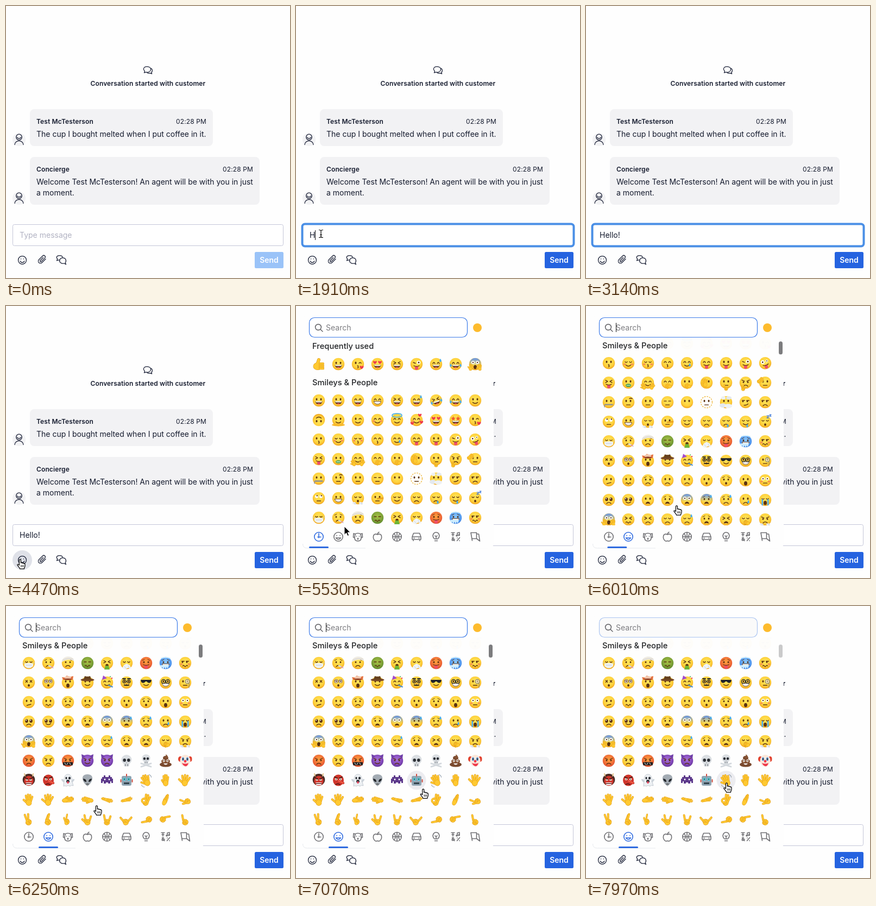
These frames come from a looping animation (523 px wide and 501 px high, 8000 ms). An HTML page:

```html
<!DOCTYPE html>
<html lang="en">
<head>
<meta charset="utf-8">
<title>Support chat</title>
<style>
  html, body { margin: 0; width: 100%; height: 100%; overflow: hidden; background: #fefefe; }
  svg { display: block; width: 100vw; height: 100vh; font-family: Inter, sans-serif; }
  text { font-size: 14px; fill: #151b2e; white-space: pre; }
  .small { font-size: 12px; letter-spacing: .12px; }
  .bold { font-weight: 600; }
  .head { font-size: 14.7px; font-weight: 500; fill: #222427; }
  .icon { fill: none; stroke: #171d33; stroke-width: 1.25; stroke-linecap: round; stroke-linejoin: round; }
  .nav { fill: none; stroke: currentColor; stroke-width: 1.6; stroke-linecap: round; stroke-linejoin: round; }
</style>
</head>
<body>
<svg viewBox="0 0 523 501">
  <defs>
    <clipPath id="view"><rect x="24" y="58" width="318.5" height="346"/></clipPath>
    <clipPath id="heads"><rect x="24" y="58" width="330" height="346"/></clipPath>
    <linearGradient id="chill" x2="0" y2="1"><stop stop-color="#5c8ff0"/><stop offset=".65" stop-color="#7fb0f5" stop-opacity="0"/></linearGradient>
    <g id="person">
      <circle r="12" fill="#f2f2f4"/>
      <g class="icon"><circle cy="-4.5" r="5.3"/><path d="M-3.6 -4.2Q0 .4 3.6 -4.2M-8 9.5C-7.5 0 7.5 0 8 9.5"/></g>
    </g>
    <path id="beam" d="M-3.5 -7q3 0 3.5 1.5q.5 -1.5 3.5 -1.5M0 -5.5V5.5M-3.5 7q3 0 3.5 -1.5q.5 1.5 3.5 1.5M-1.5 2h3"/>
  </defs>

  <g class="icon">
    <path d="M254.5 123l1 -3C252 117 253 111.5 259.5 111.5C266 111.5 267.5 116 266 119C264 122.5 260 122.5 258 121.8Z"/>
    <path d="M267.5 115C270 117 270 120 268 122l.6 2.8 -3 -1.2C263 124.3 261 123.8 260 122.8"/>
  </g>
  <text class="small bold" x="261.5" y="147" text-anchor="middle">Conversation started with customer</text>

  <rect x="44" y="190" width="337" height="68" rx="8" fill="#f2f2f4"/>
  <text class="small bold" x="56" y="217">Test McTesterson</text>
  <text class="small" x="369" y="217" text-anchor="end">02:28 PM</text>
  <text x="56" y="241">The cup I bought melted when I put coffee in it.</text>
  <use href="#person" x="24" y="246"/>

  <rect x="44" y="278" width="423" height="88" rx="8" fill="#f2f2f4"/>
  <text class="small bold" x="56" y="305">Concierge</text>
  <text class="small" x="455" y="305" text-anchor="end">02:28 PM</text>
  <text x="56" y="329">Welcome Test McTesterson! An agent will be with you in just</text>
  <text x="56" y="349">a moment.</text>
  <use href="#person" x="24" y="354"/>

  <rect x="12.5" y="402.5" width="498" height="39" rx="3" fill="#fff" stroke="#c4c6d8"/>
  <rect id="ring" x="11.5" y="401.5" width="500" height="41" rx="5" fill="#fff" stroke="#4a8fe6" stroke-width="4"/>
  <text id="hint" x="25" y="427" style="fill:#b1b2c2">Type message</text>
  <text id="typed" x="25" y="427"></text>
  <rect id="caret" y="413" width="1" height="18" fill="#111"/>

  <rect id="send" x="458" y="453" width="53" height="30" rx="2.5"/>
  <text class="bold" x="484.5" y="473" text-anchor="middle" style="fill:#fff">Send</text>

  <circle id="glow" cx="30" cy="468" r="18" fill="#dfe1e8"/>
  <g class="icon">
    <circle cx="30" cy="468" r="7.5"/>
    <path d="M26 470Q30 475 34 470M27.5 465.5v.5M32.5 465.5v.5"/>
    <path d="M73 466l-6.8 6.8a3.9 3.9 0 0 1 -5.6 -5.6l7 -7a2.7 2.7 0 0 1 3.9 3.9l-6.6 6.6a1.3 1.3 0 0 1 -1.9 -1.9l5.5 -5.5"/>
    <path d="M104.3 463C104 461 102 459.5 98.5 459.5C94 459.5 91.5 462.5 94.8 466l-1.3 3 3.5 -1.2 1.5 .2"/>
    <path d="M110.5 476l-1.3 -3C112 469 110 463.8 104.5 463.8C98.5 463.8 97.5 470 100 472.4C102 474.5 105 474.6 107 474Z"/>
  </g>

  <g id="picker">
    <rect x="11" y="18" width="353" height="428.5" rx="9" fill="#fefefe"/>
    <path d="M12.5 438q0 8 8 8H128" fill="none" stroke="#e8eaee"/>
    <g clip-path="url(#view)"><g id="list"><circle id="spot" r="17.5" fill="#ececf0"/></g></g>
    <g clip-path="url(#heads)">
      <g id="head1"><rect x="24" y="-16" width="318" height="31" fill="#fefefe" opacity=".975"/><text class="head" x="30" y="5">Frequently used</text></g>
      <g id="head2"><rect x="24" y="-16" width="318" height="31" fill="#fefefe" opacity=".975"/><text class="head" x="30" y="5">Smileys &amp; People</text></g>
    </g>
    <rect id="thumb" x="355" width="7" height="24" rx="3.5" fill="#7c7c7e"/>
    <rect x="24" y="21" width="292" height="37" rx="10" fill="#f7f7f8"/>
    <rect id="search" x="24.5" y="21.5" width="291" height="36" rx="9.5" fill="#fff" stroke="#3d7be8" stroke-width="1.2"/>
    <g fill="none" stroke="#6a6a6e" stroke-width="1.6" stroke-linecap="round"><circle cx="41" cy="39" r="5.4"/><path d="M45 43l4 4"/></g>
    <text x="55" y="45" style="fill:#7c7c80">Search</text>
    <rect id="caret2" x="55" y="31" width="1" height="17" fill="#111"/>
    <circle cx="334" cy="40" r="8" fill="#fdbb2d"/>
    <g id="tabs"></g>
    <rect id="bar" y="443" width="36" height="3" rx="1.5" fill="#2f6be0"/>
  </g>

  <g id="ibeam" fill="none" stroke-linecap="round">
    <use href="#beam" stroke="#fff" stroke-width="2.6"/>
    <use href="#beam" stroke="#000" stroke-width="1.2"/>
  </g>
  <path id="arrow" d="M0 0V15.5L3.6 12 6 17.5 8.6 16.4 6.2 11H11Z" fill="#000" stroke="#fff"/>
  <g id="point" stroke="#000" stroke-linecap="round" stroke-linejoin="round">
    <path d="M-1.6 1.2C-1.6 -.6 1.4 -.6 1.4 1.2V6.2C2 5.2 4 5.4 4.2 6.8C4.8 5.9 6.6 6.2 6.8 7.6C7.4 6.9 9 7.2 9 8.8V11.5C9 14 7.5 14.6 7.5 17H-.5C-1 14.6 -4 12.4 -5 10C-5.4 8.4 -3.4 8.2 -1.6 10.4Z" fill="#fff" stroke-width="1.25"/>
    <path d="M1.8 10.5v3M4 10.5v3M6.2 10.5v3" fill="none" stroke-width=".9"/>
  </g>
</svg>

<script>
const $ = id => document.getElementById(id);
const INK = '#5c3312', RED = '#ee3a4c', SKY = '#4aaef0', GOLD = '#ffc931', EDGE = '#dd9512';

// Drawing helpers; every emoji is centred on 0,0 with a radius near 11
const line = (d, c = INK, w = 1.4) => `<path d="${d}" fill="none" stroke="${c}" stroke-width="${w}" stroke-linecap="round" stroke-linejoin="round"/>`;
const fill = (d, c = INK) => `<path d="${d}" fill="${c}"/>`;
const oval = (x, y, rx, ry = rx, c = INK) => `<ellipse cx="${x}" cy="${y}" rx="${rx}" ry="${ry}" fill="${c}"/>`;
const pair = f => f(-4) + f(4);
const limb = d => line(d, EDGE, 3.9) + line(d, GOLD, 2.8);
const drop = (x, y, c = SKY) => fill(`M${x} ${y}c-3 4 -1.5 6 0 6s3 -2 0 -6z`, c);
const heart = (x, y, r) => fill(`M${x} ${y + r}C${x - 2 * r} ${y - r * .4} ${x - r * .8} ${y - r * 1.5} ${x} ${y - r * .4}C${x + r * .8} ${y - r * 1.5} ${x + 2 * r} ${y - r * .4} ${x} ${y + r}Z`, RED);
const star = x => fill(`M${x} -7l1.2 2.8 3 .2-2.3 2 .8 3-2.7-1.6-2.7 1.6.8-3-2.3-2 3-.2z`, '#ee5a2c');

// up: raised fingers from thumb to little finger; fan: how far the tips spread
function hand(up, turn = 0, slim = 1, fan = 1, wave = '') {
  const fingers = [[-3, 6, -9.5, 0], [-3.6, 2, -5.4, -7.5], [-1.2, 1, -1.4, -9.5], [1.4, 1, 2.6, -8.8], [3.6, 3, 6.4, -5.5]];
  let out = '', curled = '';
  fingers.forEach(([x, y, X, Y], i) => {
    if (+up[i]) out += limb(`M${x} ${y}L${X * fan} ${Y}`);
    else if (i) curled += limb(`M${x} ${y + .5}v2.5`);
    else curled += limb('M-3.5 7L1 6');
  });
  const palm = oval(0, 5.4, 5.4, 5.6, EDGE) + oval(0, 5.2, 4.9, 5.2, GOLD);
  const air = wave && line('M-11 4q-1 4 3 6M9 -7q3 2 2 6', '#8b97a5', 1);
  return `<g transform="rotate(${turn}) scale(${slim} 1)">${out}${palm}${curled}${air}</g>`;
}
const paw = (x, y, turn, up = '11111', k = .55) => `<g transform="translate(${x} ${y}) scale(${k})">${hand(up, turn)}</g>`;

const dots = pair(x => oval(x, -2.2, 1.5, 2.1));
const eyes = {
  'o': dots, '.': '',
  'O': pair(x => oval(x, -3, 2.9, 2.9, '#fff') + oval(x, -3, 1.2)),
  '^': pair(x => line(`M${x - 2} -1q2 -4 4 0`)),
  'v': pair(x => line(`M${x - 2} -2.5q2 3 4 0`)),
  '-': pair(x => line(`M${x - 2} -2h4`)),
  'x': line('M-6 -4.5l4 2.2 -4 2.2M6 -4.5l-4 2.2 4 2.2'),
  'w': oval(-4, -2.2, 1.5, 2.2) + line('M2 -1.5q2 -3 4 0'),
  'h': pair(x => heart(x * 1.15, -3, 3.1)),
  's': pair(x => star(x * 1.1)),
  'X': pair(x => line(`M${x - 1.7} -4l3.4 3.4m0 -3.4l-3.4 3.4`)),
  '@': pair(x => oval(x, -2.5, 3.6) + oval(x, -2.5, 2.9, 2.9, '#fff') + line(`M${x} -2.5q1.5 -1.5 1.5 .5t-3 0t3 -2`, INK, 1)),
  'k': line('M-6 -3l4 1.5') + oval(4, -3, 3.2, 3.2, '#fff') + oval(4, -3, 1.5),
  'z': oval(-4, -3, 3.4, 3.4, '#fff') + oval(-4, -3, 1.4) + oval(4, -3, 2.3, 2.3, '#fff') + oval(4, -3, 1),
  'p': pair(x => oval(x, -1.2, 2.8, 3.2) + oval(x - .8, -2.4, 1, 1, '#fff')),
  'r': pair(x => oval(x, -3, 2.8, 2.8, '#fff') + oval(x + .8, -4.6, 1.2)),
  'd': pair(x => oval(x - 1, -1.5, 1.4, 1.5) + line(`M${x - 2.3} -3.2h4.6`)),
  'g': pair(x => oval(x, -.8, 1.4, 1.7)) + line('M-7 -4.8l5 2.3M7 -4.8l-5 2.3', INK, 1.2),
  't': pair(x => oval(x, -1.5, 1.4, 1.8)) + line('M-7 -4.8q2.5 -.4 4 -2M7 -4.8q-2.5 -.4 -4 -2', INK, 1)
};

const grin = 'M-6.5 1.5H6.5C6 9 -6 9 -6.5 1.5Z';
const mouths = {
  '.': '',
  'D': fill(grin) + fill('M-6 1.5H6L5.3 3.5H-5.3Z', '#fff') + oval(0, 6.2, 2.6, 1, '#ef566c'),
  'G': fill(grin, '#fff') + line(grin, INK, .9) + line('M-5.5 4.2H5.5', '#b9b4ac', .7),
  'u': line('M-4.5 3.5Q0 7.5 4.5 3.5'),
  'n': line('M-4 6.5Q0 2.5 4 6.5'),
  '-': line('M-3.5 5H3.5'),
  'o': oval(0, 5.3, 1.9, 2.3),
  'O': oval(0, 5.5, 3, 3.8),
  '3': line('M-1 2.5q3 .6 .6 2.2q3 .8 0 2.4', INK, 1.2),
  'P': line('M-5 3Q0 6 5 3') + fill('M-3 4.3Q0 5.5 3 4.3V7.5A3 3 0 0 1 -3 7.5Z', '#ee506a'),
  '~': line('M-4.5 5.5q1.5 -2.5 3 0t3 0t3 0'),
  's': line('M-3 5.5Q2 6 4.5 3'),
  '/': line('M-3.5 6L4 4'),
  'm': fill('M-4.2 7.5C-3.6 2 3.6 2 4.2 7.5Q0 5.8 -4.2 7.5Z'),
  '$': oval(0, 5, 4.8, 2.8, '#3f9e52') + line('M-3 5H3', '#d6f0c8'),
  'z': line('M-6.5 4.5H6.5', '#8a8f98', 2.4) + line('M-8 5v4', '#8a8f98')
};

const steam = (x, y) => oval(x, y, 3, 2, '#eceff3') + oval(x + 2, y + 1, 2, 1.6, '#d7dde4');
const extras = {
  b: pair(x => oval(x * 1.7, 2, 2.2, 1.5, '#f58a55')),
  S: drop(8, -10), t: drop(5, 0), d: drop(3, 4),
  T: drop(-9, -1) + drop(9, -1),
  W: pair(x => line(`M${x * 1.3} 0V9`, SKY, 2.6)),
  a: line('M-9 -8.5C-9 -13 9 -13 9 -8.5S-9 -4.5 -9 -8.5', '#49aee5', 1.6),
  L: heart(-8, 6, 3) + heart(9, 4, 3) + heart(6, -9, 3),
  H: heart(7, 6, 3.2),
  m: oval(0, 9, 12, 2.6, '#f7b92c'),
  Q: paw(-8, 7, -20) + paw(8, 7, 20),
  f: paw(2, 6, -65), F: paw(-3, 0, -10, '11111', .7),
  i: paw(0, 8, 0, '01000', .6), c: paw(-3, 9, 30, '11000', .6), s: paw(-9, -4, 55, '01111', .6),
  e: line('M2 -6.5q2.5 -2 5 0'),
  C: oval(-6, 6, 6, 4, '#e4e9ee') + oval(4, 7, 7, 4, '#eef1f4') + oval(5, -8, 5, 3, '#e4e9ee') + oval(-5, -8, 4, 3, '#eef1f4'),
  M: fill('M-8 1Q0 -1 8 1V6Q0 13 -8 6Z', '#eef2f6') + line('M-8 1l-2.5 -2M8 1l2.5 -2M-5 4H5', '#c4ccd6', 1),
  y: line('M1 5l8 4', '#dfe5ea', 2.4) + line('M5 7l3 1.5', RED, 1),
  n: fill('M-11 -2C-11 -15 11 -15 11 -4Q0 -9 -11 -2Z', '#efece5') + line('M-10 -5Q0 -11 10 -7', '#cfc9bb', .8),
  V: fill('M-3 5H3L5 12H-5Z', '#6fb536'),
  j: fill('M-5 4L0 1 6 4 9 11 3 9-3 12-8 9Z', '#f1f4f7') + line('M-4 6l3 4M3 5l2 4', '#c5ced8', .8),
  I: fill('M-10 4l2 7 2-4 2 5 2-5 2 5 2-5 2 4 2-7z', '#cfeeff') + line('M-8 -9Q0 -12 8 -9', '#d6f1ff', 2),
  q: fill('M-9 -5L-11 -10-5 -9-2 -13 3 -10 10 -12 9 -5Z', '#e5713f') + oval(0, -9, 6, 3, '#f2c9b0') + oval(0, -6, 7, 1.6, '#8d3d24'),
  K: oval(0, -5, 12.5, 2.8, '#7a4a26') + fill('M-7 -5.5L-5 -12Q0 -10 5 -12L7 -5.5Z', '#65401f'),
  Y: fill('M-9 -5L-7 -13 0 -8Z', '#a24bd0') + line('M3 5l7 3', '#3f8fe0', 2) + oval(9, -8, 1.2, 1.2, RED) + oval(6, -11, 1, 1, '#3fae58'),
  G: line('M-7 -2a3 3 0 1 0 6 0a3 3 0 1 0 -6 0M1 -2a3 3 0 1 0 6 0a3 3 0 1 0 -6 0M-1 -2h2', '#222', 1.2) + oval(0, 2, 2, 2.4, '#f4b02c') + fill('M-6 6Q0 1 6 6Q0 5 -6 6Z', '#222') + line('M-7 -7h5M7 -7h-5', '#222', 1.8),
  N: fill('M-10 -5H10L9 -1Q5 3 1 -2H-1Q-5 3 -9 -1Z', '#20242b'),
  8: pair(x => `<circle cx="${x}" cy="-2" r="3.6" fill="none" stroke="#262626" stroke-width="1.3"/>`),
  1: '<circle cx="4" cy="-2" r="3.8" fill="#fff" fill-opacity=".5" stroke="#6d6d70" stroke-width="1.1"/>' + line('M7 1v9', '#6d6d70', .8),
  B: oval(0, 0, 11, 11, 'url(#chill)'),
  A: paw(-8, 6, 10) + paw(8, 6, -10),
  2: steam(-7, 9) + steam(5, 9),
  4: '<rect x="-9" y="2.5" width="18" height="6" rx="1" fill="#222"/>' + line('M-6 4l2 3M-2 7l2 -3M3 4l2 3', '#fff', 1),
  5: fill('M-10 -4L-11 -12-4 -9ZM10 -4L11 -12 4 -9Z', '#6f3fa8'),
  Z: line('M3 -11h4l-4 4h4M8 -13h3l-3 3h3', '#3c76d8', 1.2),
  l: line('M0 1L10 0', '#e9a321', 2.8)
};

const skins = { y: ['#ffe65c', '#fed13c', '#f0a01c'], r: ['#fba23c', '#f26f38', '#dc4a2c'], p: ['#a873d8', '#8549bd', '#623494'], g: ['#a9c247', '#7fa338', '#5b862b'], u: ['#8cc8fb', '#58a0f3', '#3678dd'] };
for (const [k, c] of Object.entries(skins))
  document.querySelector('defs').insertAdjacentHTML('beforeend', `<radialGradient id="skin-${k}" cy=".4" r=".62"><stop stop-color="${c[0]}"/><stop offset=".65" stop-color="${c[1]}"/><stop offset="1" stop-color="${c[2]}"/></radialGradient>`);

function face([e, m, ...more]) {
  const skin = more.find(c => skins[c]) || 'y';
  const turn = more.includes('U') ? 180 : more.includes('R') ? -18 : 0;
  const under = more.includes('B') ? extras.B : '';
  return `<g transform="rotate(${turn})">${oval(0, 0, 11.2, 11.2, `url(#skin-${skin})`)}${under}${eyes[e]}${mouths[m]}${more.filter(c => c !== 'B').map(c => extras[c] || '').join('')}</g>`;
}

const bone = oval(0, -2, 9.5, 9, '#dadee2') + '<rect x="-5" y="3" width="10" height="7.5" rx="2" fill="#dadee2"/>' + pair(x => oval(x * .95, -1, 2.8, 3, '#2b2f35')) + line('M-2 6.5v3M2 6.5v3M0 3.5v.5', '#5b626b', 1);
const mask = oval(0, 0, 10, 10.5, '#cf352b') + pair(x => oval(x, -2, 2.4, 2, '#fff') + oval(x, -2, 1)) + line('M-7 -6l5 2M7 -6l-5 2', '#3a1810', 1.8);
const things = {
  dot: `<circle r="10.5" fill="#fff" stroke="#efb83e" stroke-width="1.4" stroke-dasharray="2.5 2"/>` + dots + mouths['-'],
  skull: bone,
  bones: line('M-9 5L9 11M9 5L-9 11', '#d3d8dd', 2.8) + `<g transform="translate(0 -3) scale(.8)">${bone}</g>`,
  poo: oval(0, 7, 11, 4.5, '#7a4a2e') + oval(0, 1, 8, 4.5, '#865334') + oval(0, -5, 5, 4, '#7a4a2e') + fill('M-3 -6Q2 -7 0 -12Q6 -9 3 -4Z', '#865334') + pair(x => oval(x * .8, 0, 2, 2.5, '#fff') + oval(x * .8, 0, 1)) + fill('M-4 5H4Q0 10 -4 5Z', '#fff'),
  clown: oval(-9, -3, 4, 5, '#e2432f') + oval(9, -3, 4, 5, '#e2432f') + oval(0, 0, 9.5, 11, '#fbe9dc') + pair(x => oval(x, -3, 2, 3.2, '#3f8edb') + oval(x, -3, 1.1, 1.6)) + oval(0, 1, 2.4, 2.4, RED) + fill('M-6 4Q0 7 6 4Q4 11 0 10T-6 4Z', RED),
  ogre: oval(0, -1, 11.3, 11, '#4a2a24') + `<g transform="translate(0 1) scale(.88)">${mask}</g>` + fill('M-5.5 4H5.5L4.5 9H-4.5Z', '#fff') + line('M-5 6H5', '#5a1713') + line('M-7 -8l-1 -4M7 -8l1 -4', '#e5c38a', 2),
  goblin: mask + line('M0 1L9 5', '#a82620', 4.4) + line('M0 1L9 5', '#ef5340', 3.2) + line('M-5 8Q-1 5 3 8', '#3a1810'),
  ghost: `<path d="M-8 11C-7 4 -9 -11 0 -11S7 3 10 10Q6 8 4 11Q0 8 -3 11Q-6 9 -8 11Z" fill="#edf0f3" stroke="#c3cad2"/>` + line('M-8 2l-2.5 -3M8 2l2.5 -3', '#cbd2d9', 3) + oval(-3, -4, 1.6, 2.3, '#2d3138') + oval(3, -4, 2.2, 2.6, '#2d3138') + oval(0, 2, 3, 3, '#2d3138') + oval(0, 4, 1.8, 2.2, '#ee506a'),
  alien: fill('M0 -11C14 -11 10 4 0 11C-10 4 -14 -11 0 -11Z', '#a3abb3') + fill('M-8 -3Q-2 -3 -2 3Q-7 3 -8 -3ZM8 -3Q2 -3 2 3Q7 3 8 -3Z', '#1f2328') + line('M-2 7H2', '#444'),
  pixel: fill('M-6 -9h3v3h6v-3h3v3h3v3h2v8h-3v-3h-2v4h-4v-2h-4v2h-4v-4h-2v3h-3v-8h2v-3h3z', '#5d3a8c') + pair(x => `<rect x="${x - 1.2}" y="-3" width="2.4" height="2.8" fill="#fff"/>`),
  robot: '<rect x="-9" y="-8" width="18" height="18" rx="3" fill="#8fa4b2"/>' + line('M0 -8v-3M-10.5 -1v4M10.5 -1v4', '#d04a3d', 2) + pair(x => oval(x, -2, 2.6, 2.6, '#3fd0e6') + oval(x, -2, 1.1)) + '<rect x="-5" y="4" width="10" height="3" fill="#33424c"/>',
  thumb: line('M-4 4L0 -8', EDGE, 6) + oval(-2, 4, 8.5, 7, EDGE) + line('M-4 4L0 -8', GOLD, 4.8) + oval(-2, 4, 8, 6.5, GOLD) + [-1, 2.2, 5.4, 8.4].map(y => limb(`M2 ${y}H8`)).join(''),
  okay: hand('00111', 8) + '<circle cx="-4" cy="1.5" r="3.6" fill="#fefefe" stroke="#dd9512" stroke-width="3.6"/>' + '<circle cx="-4" cy="1.5" r="3.6" fill="none" stroke="#ffc931" stroke-width="2.6"/>'
};

function emoji(code) {
  if (code[0] === '!') return things[code.slice(1)];
  if (code[0] === '#') return hand(...code.slice(1).split(','));
  return face(code);
}

const rows = `oD oD ^D ^G xD ^DS xDTR ^DT ou
ouU oum wu ^ub ^ua ^ubL hD sD w3H
o3 vub v3b ^3 ^ut ^P oP kP zPR
xP o$ ^uQ ^.f o.f o.F o-i gnc o-s
oz o-e o- -- o. !dot o.C ds dn
r- oG vo2 o-l vu vn vnd vud voZ
v.M tny tnn -~g xOV v.j tPr tGuI d~b
Xo @o oOq ouK ^uY ouG .uN oG8 o-1
o/ o~ tn on on oo to oO O-b
pn pu om tm OmB tmBS tnS ont vOW
OOBA x~ xn vn vnS tm xm vOf gn2
gnr gn g.r4 gup5 gnp5 !skull !bones !poo !clown
!ogre !goblin !ghost !alien !pixel !robot #11111,-25,1,1,w #11111,0,.9,.8 #11111,8,1,1.2
#11111 #11111,4,1,1.2 #11111,80,.75,.8 #11111,-80,.75,.8 #01111,105,.5 #01111,75,.5 !okay #11111,25,.75,.4 #11000,-60,.9
#01100,5,1,1.5 #01100,10,1,.3 #11000,20,.8 #11001 #01001 #10001,15,1,1.2 #01000,-90 #01000,90 #01000`.split('\n');
const often = '!thumb oD w3H hD xD kP ^DS ^DT OOBA';

const addRow = (codes, y) => $('list').insertAdjacentHTML('beforeend', codes.split(' ').map((c, i) => `<g transform="translate(${42 + 36 * i} ${y})">${emoji(c)}</g>`).join(''));
addRow(often, 107);
rows.forEach((r, i) => addRow(r, 174 + 36 * i));

const ringed = '<circle r="8.2"/>';
const tabs = [
  ringed + '<path d="M0 -6V2M-2.2 .5H4"/>',
  ringed + '<path d="M-3 -2.5v.6M3 -2.5v.6M-4.5 2H4.5Q0 8 -4.5 2Z"/>',
  '<path d="M-5 -5Q0 -8 5 -5L8 -6 8.5 1 6 2Q6 8 0 8T-6 2L-8.5 1-8 -6ZM-2.5 -1v.5M2.5 -1v.5M-1 3h2M0 3v2.5M-5 -5l-1 6M5 -5l1 6"/>',
  '<path d="M0 -4C-9 -8 -9 3 -5 7Q-3 9 0 7.5Q3 9 5 7C9 3 9 -8 0 -4ZM0 -4Q0 -7 3 -8.5"/>',
  ringed + '<path d="M-8 0H8M0 -8V8M-5.5 -6Q0 0 -5.5 6M5.5 -6Q0 0 5.5 6"/>',
  '<path d="M-8 0L-5.5 -6.5H5.5L8 0V5H-8ZM-8 0H8M-6 5v2.5M6 5v2.5M-5 2.5h1M4 2.5h1"/>',
  '<path d="M-3 4C-8 0 -6 -8 0 -8S8 0 3 4ZM-2.5 7.5h5M-2 -2L0 0 2 -2M0 0V4"/>',
  '<path d="M-8 -7.5H-2M-5 -7.5V-1M-7 -4H-3M3 -2V-7L7 -8V-3"/><circle cx="2" cy="-2" r="1"/><circle cx="6" cy="-3" r="1"/><path d="M-2 7.5L-6.5 2.5Q-5 .5 -3.5 2.5L-7 5.5Q-5 9 -2 4.5M2.5 7.5L7.5 1.5M3 2v.4M7 7v.4"/>',
  '<path d="M-5.5 7L-8 -7.5H2.5V3.5H-6M2.5 -5H6.500L8.500 8L2.500 3.500"/>'
];
$('tabs').innerHTML = tabs.map((s, i) => `<g class="nav" transform="translate(${42 + 36 * i} 425)">${s}</g>`).join('');
const tabEls = [...$('tabs').children];

// Timeline
const LOOP = 8000;
const typing = [[0, ''], [1910, 'H'], [2030, 'He'], [2260, 'Hel'], [2320, 'Hell'], [2490, 'Hello'], [2960, 'Hello!']];
const caretOn = [[830, 1370], [1910, 3140], [3730, 4290]];
const caret2On = [[4820, 5350], [5890, 6410], [6950, 7610]];
const mouse = [[470, 0, 423], [650, 46, 419.5], [3700, 46, 419.5], [4290, 26, 467], [5100, 26, 467], [5530, 89, 406], [5740, 167, 368], [6490, 167, 368], [7370, 259, 326]];
const scroll = [[5770, 0], [5830, 10], [5890, 38], [5950, 85], [6010, 140], [6070, 190], [6130, 235], [6190, 268], [6250, 285]];

const clamp = v => Math.max(0, Math.min(1, v));
const smooth = u => u * u * (3 - 2 * u);
const during = (spans, t) => spans.some(([a, b]) => t >= a && t < b);
function track(keys, t, col, ease = u => u) {
  let i = keys.findIndex(k => k[0] > t);
  if (i < 0) i = keys.length;
  if (i === 0) return keys[0][col];
  if (i === keys.length) return keys[i - 1][col];
  const a = keys[i - 1], b = keys[i];
  return a[col] + (b[col] - a[col]) * ease((t - a[0]) / (b[0] - a[0]));
}
const show = (id, on) => $(id).style.display = on ? '' : 'none';
const move = (id, x, y) => $(id).setAttribute('transform', `translate(${x} ${y})`);

function render(t) {
  const text = typing.filter(k => k[0] <= t).pop()[1];
  $('typed').textContent = text;
  show('hint', !text);
  show('ring', t >= 830 && t < 4470);
  show('caret', during(caretOn, t));
  $('caret').setAttribute('x', 25 + (text ? Math.floor($('typed').getComputedTextLength()) : 0));
  $('send').setAttribute('fill', text ? '#2563e0' : '#9ac3f8');

  const x = track(mouse, t, 1, smooth), y = track(mouse, t, 2, smooth);
  const open = t >= 4640;
  const onButton = Math.hypot(x - 30, y - 468) < 18;
  const kind = t < 480 || (t >= 1970 && t < 3730) ? '' :
    onButton ? 'point' : !open && y < 442 ? 'ibeam' : open && y < 404 ? 'point' : 'arrow';
  for (const id of ['ibeam', 'arrow', 'point']) {
    show(id, id === kind);
    move(id, x, y);
  }
  show('glow', onButton && t >= 3730);

  show('picker', open);
  $('picker').style.opacity = clamp((t - 4600) / 200);
  const s = track(scroll, t, 1);
  move('list', 0, -s);
  move('head1', 0, Math.max(74 - s, 72) - Math.max(0, s - 38));
  move('head2', 0, Math.max(141 - s, 73));

  const hover = y < 400 && (t > 5580 && t < 5770 || t > 6520);
  show('spot', hover);
  const row = Math.round((y - 174 + s) / 36);
  $('spot').setAttribute('cx', 42 + 36 * Math.round((x - 42) / 36));
  $('spot').setAttribute('cy', 174 + 36 * row);

  const fade = clamp((t - 7850) / 180);
  show('thumb', t >= 5770);
  $('thumb').setAttribute('y', 59.5 + .04 * s);
  $('thumb').style.opacity = 1 - .9 * fade;
  $('search').style.opacity = 1 - .9 * fade;
  show('caret2', during(caret2On, t));

  const slide = smooth(clamp((t - 5930) / 180));
  $('bar').setAttribute('x', 24 + 36 * slide);
  const active = t < 5940 ? 0 : 1;
  tabEls.forEach((el, i) => el.style.color = i === active ? '#2f6be0' : '#707074');
}

const start = performance.now();
function tick() {
  render((performance.now() - start) % LOOP);
  requestAnimationFrame(tick);
}
tick();
</script>
</body>
</html>
```
